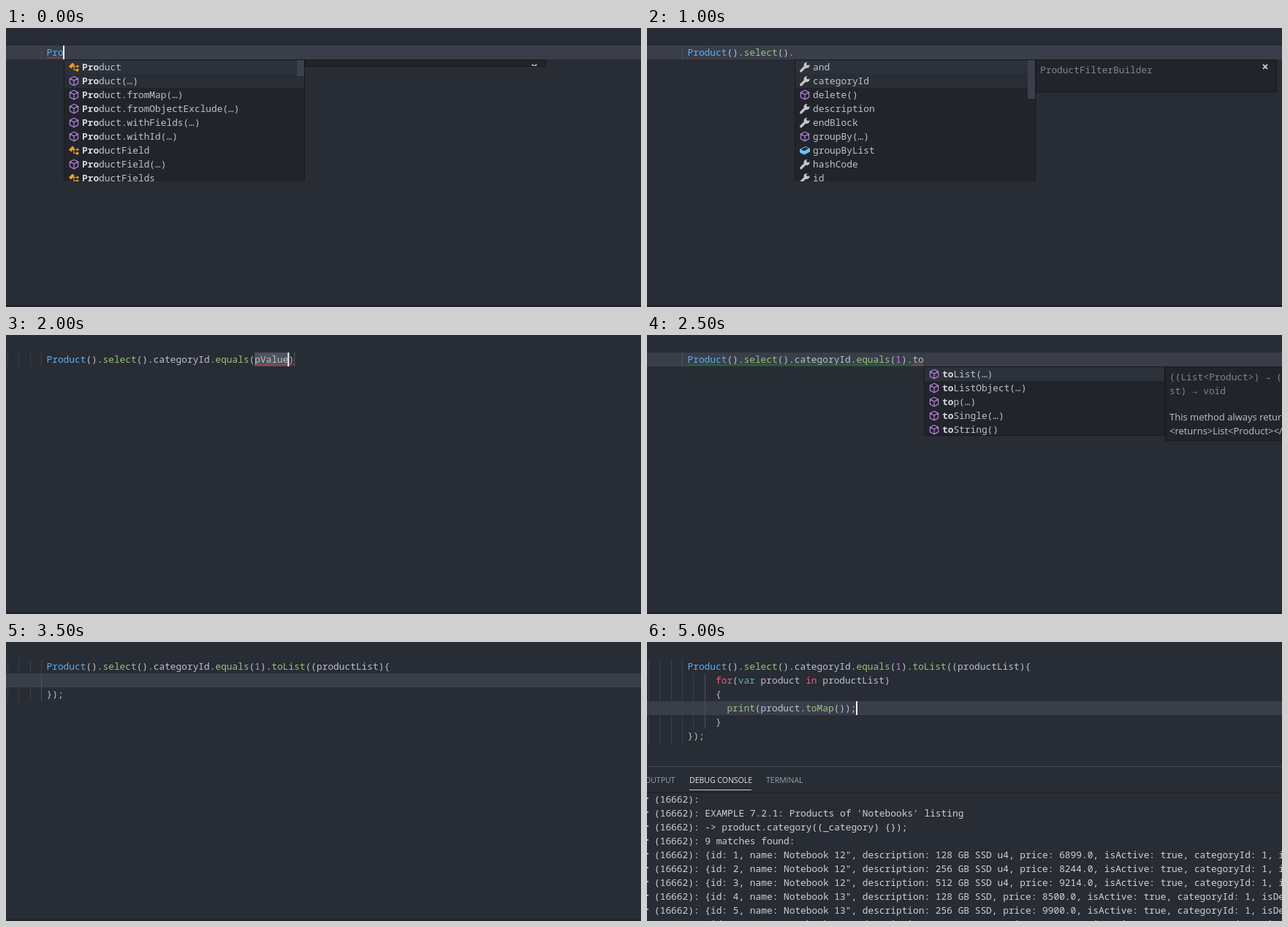
Animation of 869x382 px, one loop 5.5 s. Source, as an HTML page:

```html
<!DOCTYPE html>
<html lang="en">
<head>
<meta charset="utf-8">
<title>Editor completion</title>
<style>
  html, body { margin: 0; width: 100%; height: 100%; overflow: hidden; background: #282c34; }
  #stage { position: relative; width: 869px; height: 382px; overflow: hidden; }
  #reel { display: block; animation: play 5.5s steps(11, end) -1ms infinite; }
  @keyframes play { to { transform: translateY(-4202px); } }
  text { white-space: pre; font: 12.83px "Noto Sans Mono", "DejaVu Sans Mono", monospace; fill: #bcc2cc; }
  .blue { fill: #61afef; }
  .green { fill: #98c379; }
  .red { fill: #e9657a; }
  .cyan { fill: #56b6c2; }
  .purple { fill: #c678dd; }
  .dim { fill: #80858e; }
  .hit { font-weight: bold; fill: #d7dae0; }
  .prose { font: 13px "Open Sans", "Noto Sans", sans-serif; }
  .tab { font: 10.5px "Open Sans", "Noto Sans", sans-serif; fill: #9a9fa8; }
  .on { fill: #e4e6ea; }
  .log { fill: #cfd1d5; }
</style>
</head>
<body>
<div id="stage"></div>
<script>
const W = 869, H = 382, ROW = 19, CHAR = 7.698, LEFT = 55.5;
const col = n => LEFT + n * CHAR;
const esc = s => s.replace(/&/g, '&amp;').replace(/</g, '&lt;');
const rect = (x, y, w, h, fill) => `<rect x="${x}" y="${y}" width="${w}" height="${h}" fill="${fill}"/>`;
const text = (x, y, body, cls = '') => `<text x="${x}" y="${y}" class="${cls}">${body}</text>`;

// Syntax colours
const kinds = ['blue', 'green', 'red', 'cyan', 'purple'];
const syntax = /\b(?:(Pro|Product)|(select|equals|toList|print|toMap)|(for|in)|(var)|(\d+))\b/g;
const paint = s => s.replace(syntax, (word, ...groups) =>
  `<tspan class="${kinds[groups.findIndex(g => g)]}">${word}</tspan>`);
const code = (row, n, s) => text(col(n), 38 + row * ROW, paint(s));

// Editor decorations
const caret = x => (row => rect(x, 24 + row * ROW, 2, ROW, '#f4f5f7'));
const lineBar = row => rect(0, 24 + row * ROW, W, ROW, '#393e4a');
const guide = (x, from, to, fill = '#3b4048') => rect(x, 24 + from * ROW, 1, (to - from) * ROW, fill);
const guides = rows => [2, 17, 33, 48].map(x => guide(x, 0, rows)).join('');
const wave = (from, to, row, stroke) => {
  let d = `M${col(from)} ${41.7 + row * ROW}`;
  for (let x = 0, up = true; x < (to - from) * CHAR - 1; x += 2.5, up = !up) d += `l2.5 ${up ? -2 : 2}`;
  return `<path d="${d}" fill="none" stroke="${stroke}"/>`;
};
const RED = '#d8413c', GREEN = '#1f8a2a', ORANGE = '#cf6a32';

// Completion icons, drawn around 0,0
const icons = {
  method: '<path d="M0-6.2L5.6-3.4V3.4L0 6.4L-5.6 3.4V-3.4ZM-5.6-3.4L0-.4L5.6-3.4M0-.4V6.4" fill="none" stroke="#b180d7" stroke-width="1.2"/>',
  type: '<path d="M-7-1L-2-6L1-3L-4 2ZM3-1L5-3L7-1L5 1ZM2 4L4.5 1.8L7 4L4.5 6.4Z" fill="#ee9d28"/><path d="M-1-1H4M0-1V4H4" fill="none" stroke="#ee9d28" stroke-width="1.2"/>',
  prop: '<path d="M-5.2 5.2L2-2" stroke="#c5c5c5" stroke-width="3.4" stroke-linecap="round"/><path d="M6.4-3.6A4 4 0 1 1 3.4-6.4L1.6-3.8L3.6-1.8Z" fill="#c5c5c5"/>',
  field: '<path d="M-7-1.5L1-5.5L7-2.5V2L-1 6L-7 3Z" fill="#75beff"/><path d="M-5.4-1.5L1-4.6L5.4-2.4L-1 .9Z" fill="#282c34"/>'
};

// Completion list; each item is "kind label"
function list(n, items, hits, { height = 167, thumb = 0, hover = false } = {}) {
  const rows = items.map((item, i) => {
    const [kind, label] = item.split(' ');
    const body = `<tspan class="hit">${label.slice(0, hits)}</tspan>${label.slice(hits)}`;
    return `<g transform="translate(14 ${10.5 + i * ROW})">${icons[kind]}</g>` + text(25, 15 + i * ROW, body);
  }).join('');
  return `<svg x="${Math.round(col(n))}" y="43" width="330" height="${height}">`
    + rect(0, 0, 330, 400, '#181a1f') + rect(1, 1, 328, height - (height < 167 ? 2 : 1), '#21252b')
    + rect(1, 1, 328, ROW, '#2c313a') + (hover ? rect(1, 20, 328, ROW, '#292d35') : '')
    + rows + (thumb ? rect(319, 1, 10, thumb, '#3b404b') : '') + '</svg>';
}

// Details box to the right of the list
function details(n, height, lines, prose = []) {
  return `<svg x="${Math.round(col(n)) + 330}" y="43" width="330" height="${height}">`
    + rect(0, 0, 330, height, '#181a1f') + rect(1, 1, 328, height - 2, '#21252b')
    + lines.map((s, i) => text(6, 19 + i * ROW, esc(s), 'dim')).join('')
    + prose.map((s, i) => text(6, 74 + i * ROW, esc(s), 'prose')).join('')
    + `<path d="M311 7L317 13M317 7L311 13" stroke="#c5c8cd" stroke-width="1.8"/>`
    + rect(0, height - 1, 330, 1, '#181a1f') + '</svg>';
}

const footer = rect(0, 379, W, 3, '#21252b');
const typing = lineBar(0) + guide(48, 0, 1, '#4b515c');
const select = 'Product().select().';
const query = select + 'categoryId.equals(1).';

// Placeholder argument waiting to be overwritten
const placeholder = (before, arg) => {
  const a = before.length, b = a + arg.length;
  return guides(1) + rect(col(a), 24, arg.length * CHAR, ROW, '#4d525d') + code(0, 0, before + arg + ')')
    + wave(a, b + 1, 0, RED) + caret(col(b) - 1)(0) + rect(col(b + 1), 24, 1, ROW, '#5c626d');
};

const block = code(0, 0, query + 'toList((productList){');
function loop(done) {
  const name = done ? 'product' : '<tspan class="dim">product</tspan>';
  return guides(6) + guide(63, 1, 5) + lineBar(3) + guide(79, 1, 5, '#4b515c') + block
    + code(1, 5, `for(var `) + text(col(13), 57, name) + code(1, 21, 'in productList)')
    + code(2, 5, '{') + code(4, 5, '}') + code(5, 0, '});')
    + (done ? code(3, 7, 'print(product.toMap());') + caret(286)(3) : wave(13, 20, 1, GREEN));
}

function consolePanel() {
  const item = (id, size, disk, price) =>
    `{id: ${id}, name: Notebook ${size}", description: ${disk}, price: ${price}.0, isActive: true, categoryId: 1, isDeleted: false}`;
  const lines = [
    '', "EXAMPLE 7.2.1: Products of 'Notebooks' listing", '-> product.category((_category) {});', '9 matches found:',
    item(1, 12, '128 GB SSD u4', 6899), item(2, 12, '256 GB SSD u4', 8244), item(3, 12, '512 GB SSD u4', 9214),
    item(4, 13, '128 GB SSD', 8500), item(5, 13, '256 GB SSD', 9900), item(6, 13, '512 GB SSD', 11000)
  ];
  return rect(0, 170, W, 1, '#464b55')
    + text(-3, 193, 'OUTPUT', 'tab') + text(58, 193, 'DEBUG CONSOLE', 'tab on') + text(163, 193, 'TERMINAL', 'tab')
    + rect(58, 202, 85, 1, '#c8cbd0') + rect(0, 205, W, 2, '#21252b')
    + lines.map((s, i) => rect(0, 213 + i * ROW, 2, 2, '#a9adb5')
      + text(10, 220 + i * ROW, esc('(16662): ' + s), 'log')).join('');
}

const scenes = [
  typing + code(0, 0, 'Pro') + wave(0, 3, 0, RED) + caret(78)(0)
    + list(3, ['type Product', 'method Product(…)', 'method Product.fromMap(…)', 'method Product.fromObjectExclude(…)',
      'method Product.withFields(…)', 'method Product.withId(…)', 'type ProductField', 'method ProductField(…)',
      'type ProductFields'], 3, { thumb: 22, hover: true })
    + details(3, 10, []) + footer,

  typing + code(0, 0, 'Product().se') + wave(0, 10, 0, GREEN) + wave(10, 12, 0, ORANGE)
    + list(12, ['method select(…)'], 2, { height: 21 })
    + details(12, 64, ['({List<String> columnsToSelect, bool getI', 'sDeleted}) → ProductFilterBuilder']) + footer,

  typing + code(0, 0, select)
    + list(19, ['prop and', 'prop categoryId', 'method delete()', 'prop description', 'prop endBlock', 'method groupBy(…)',
      'field groupByList', 'prop hashCode', 'prop id'], 0, { thumb: 53, hover: true })
    + details(19, 45, ['ProductFilterBuilder']) + footer,

  typing + code(0, 0, select + 'categoryId.')
    + list(30, ['method between(…)', 'method contains(…)', 'method endsWith(…)', 'method equals(…)', 'method equalsOrNull(…)',
      'method greaterThan(…)', 'prop hashCode', 'method inValues(…)', 'method isNull()'], 0, { thumb: 85, hover: true })
    + details(30, 64, ['(dynamic pFirst, dynamic pLast) → Product', 'FilterBuilder']) + footer,

  placeholder(select + 'categoryId.equals(', 'pValue') + footer,

  typing + code(0, 0, query + 'to') + wave(0, 40, 0, GREEN) + wave(40, 42, 0, ORANGE)
    + list(42, ['method toList(…)', 'method toListObject(…)', 'method top(…)', 'method toSingle(…)', 'method toString()'],
      2, { height: 95 })
    + details(42, 102, ['((List<Product>) → (void productLi', 'st) → void'],
      ['This method always returns a list.', '<returns>List<Product></returns>']) + footer,

  placeholder(query + 'toList(', 'productList') + footer,

  guides(3) + lineBar(1) + guide(48, 1, 3, '#4b515c') + block + code(2, 0, '});') + footer,

  loop(false) + footer,
  loop(true) + footer,
  loop(true) + consolePanel()
];

document.getElementById('stage').innerHTML =
  `<svg id="reel" width="${W}" height="${H * scenes.length}">`
  + scenes.map((s, i) => `<svg y="${i * H}" width="${W}" height="${H}">${rect(0, 0, W, H, '#282c34')}${s}</svg>`).join('')
  + '</svg>';
</script>
</body>
</html>
```
